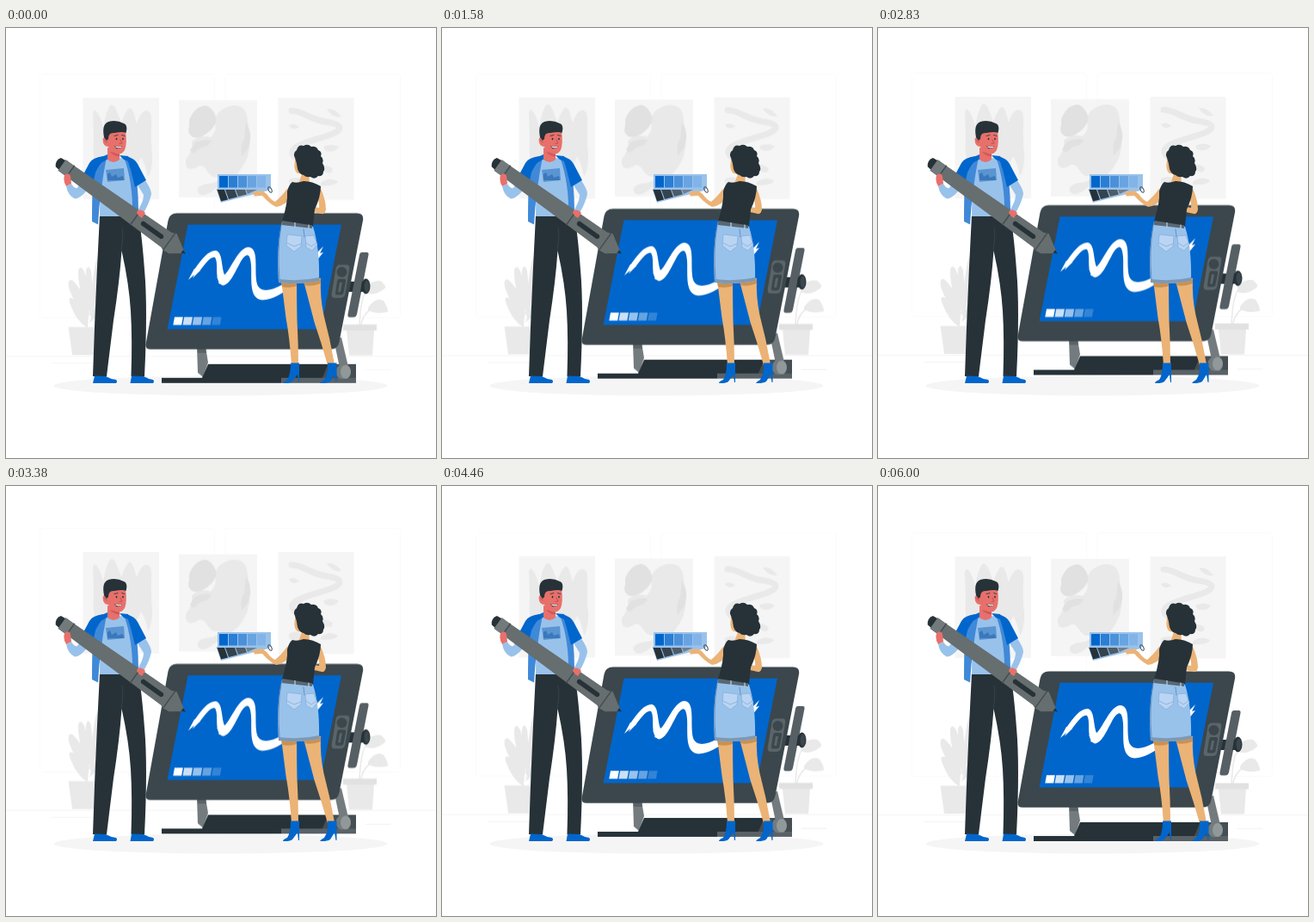
An HTML page that plays this animation: 500x500 px, repeating every 6040 ms.

```html
<!DOCTYPE html>
<html lang="en">
<head>
<meta charset="utf-8">
<title>Drawing tablet</title>
<style>
html, body { margin: 0; width: 100%; height: 100%; overflow: hidden; background: #fff; }
svg { display: block; width: 100vw; height: 100vh; }
.blue { fill: #0066cc; }
.mid { fill: #4089d8; }
.pale { fill: #99c2eb; }
.ink { fill: #263238; }
.body { fill: #3b474c; }
.steel { fill: #737b7e; }
.skin { fill: #e7706b; }
.tan { fill: #ebb376; }
.g1 { fill: #f5f5f5; }
.g2 { fill: #e9e9e9; }
.g3 { fill: #e1e1e1; }
.line { fill: none; stroke-linecap: round; stroke-linejoin: round; }
</style>
</head>
<body>
<svg viewBox="0 0 500 500">
  <g id="room">
    <g class="line" stroke="#fafafa">
      <rect x="39.5" y="54.5" width="203" height="283" rx="3"/>
      <rect x="255" y="54.5" width="203.500" height="283" rx="3"/>
      <path stroke="#f4f4f4" d="M0 382.500H500M53 390.500H108M418 398.500H447"/>
    </g>
    <g class="g1">
      <rect x="89.500" y="82" width="88.500" height="118"/>
      <rect x="201" y="84.700" width="91" height="113"/>
      <rect x="316.500" y="82" width="88" height="118.500"/>
    </g>
    <path class="g2" d="M101 101Q102 93 106 99Q111 107 113 117Q116 98 121 91Q125 88 129 98L134 111Q138 100 142 95Q146 91 149 102L152 112Q156 99 162 97Q169 96 169 108Q168 131 170 150Q170 166 165 174Q162 158 157 151Q149 168 143 183Q130 160 120 172Q112 188 107 174Q100 151 102 130Z"/>
    <path class="g2" d="M247 99Q261 87 274 93Q281 98 281 111Q286 131 281 150Q277 161 268 171L244 187Q230 199 224 193Q219 185 234 182Q247 181 249 174Q239 176 234 167Q228 157 221 163Q208 169 209 154Q218 143 216 133Q224 124 238 128Q247 119 242 108Z"/>
    <path class="g3" d="M213 108Q219 92 232 91Q240 93 244 104Q246 113 235 122Q224 131 216 127Q210 122 213 115ZM279 111Q288 125 281 141L274 150Q272 136 277 130ZM220 134Q232 129 239 132L234 138Q225 139 218 147L214 143Z"/>
    <path class="line" stroke="#e9e9e9" stroke-width="7" d="M332 97C345 97 355 108 372 110C394 113 392 120 374 126C355 132 330 138 333 147C336 156 352 158 376 166"/>
    <path class="g2" d="M373 95Q383 94 390 104Q380 106 373 95ZM329 114Q335 110 341 116Q333 121 329 114ZM369 139Q378 134 387 139Q381 147 371 143ZM366 181Q375 173 386 179Q384 185 366 184ZM329 177Q343 171 350 183Q339 190 329 182Z"/>
    <g class="g2">
      <path d="M72.500 348.500H116L112 381H77Z"/>
      <path d="M94 349Q82 342 75 323Q71 313 77 315Q88 320 95 342ZM94 340Q78 319 73 303Q71 292 77 294Q92 307 97 334ZM94 328Q83 301 84 283Q86 275 91 284Q97 305 97 325ZM95 329Q91 301 93 282Q96 274 99 284Q102 306 98 330ZM97 333Q100 294 104 275Q106 264 110 269Q113 291 99 338ZM97 344Q104 316 116 309Q120 314 113 330Z"/>
      <path d="M396 352H428L426 381.500H399Z"/>
      <path d="M418 302Q427 293 436 295Q442 300 441 303Q430 313 418 309ZM421 326Q430 313 439 318Q444 325 444 331Q430 334 421 329Z"/>
    </g>
    <path class="line" stroke="#e9e9e9" stroke-width="1.500" d="M94 350Q96 330 96 313M411 350Q412 313 420 305M412 350Q414 334 424 328"/>
    <path class="g3" d="M392 345.500H431V352.500H392Z"/>
  </g>

  <ellipse class="g1" cx="249.500" cy="416" rx="194" ry="11.500"/>

  <g id="tablet">
    <path class="steel" d="M222 371H232L235 389L229 406L223 401Z"/>
    <path fill="#5a6367" d="M222 371H232L233 378H223Z"/>
    <path class="ink" d="M235 391H407V413H181V407H228Z"/>
    <path fill="#596266" d="M375 391H407V413H320V407H368Z"/>
    <path fill="#444e53" d="M375 391H407V407H368Z"/>
    <path class="steel" d="M381 362L390 360L398 394L389 400Z"/>
    <ellipse class="steel" cx="391" cy="400" rx="7.500" ry="8.500"/>
    <ellipse cx="395" cy="400" rx="6" ry="8" fill="#91989a"/>
    <path class="ink" d="M397 295H418V307H397Z"/>
    <path fill="#566064" d="M414 261H419.500Q422 261 421.500 264L408 333Q407 336.500 404 336.500H399.500Q397 336.500 397.500 333L411 264Q411.500 261 414 261Z"/>
    <path class="ink" d="M414 295H419V307H412Z"/>
    <ellipse class="ink" cx="418.500" cy="300.500" rx="5" ry="9"/>
    <ellipse cx="419.500" cy="300.500" rx="3" ry="7" fill="#3b474c"/>
    <path class="body" d="M199 215.500H408Q416.500 215.500 415 224L387.500 365Q386 373.800 377 373.800H168Q161.500 373.800 162.700 367L188.500 224Q190 215.500 199 215.500Z"/>
    <path class="blue" d="M211.500 228.800H390L366 350.600H187.500Z"/>
    <path fill="#5a656a" d="M388 275.500H396Q400 275.500 399.300 280L394.500 309Q393.700 314 389 314H382Q378 314 378.700 309L383.500 280Q384.300 275.500 388 275.500Z"/>
    <circle class="body" cx="390.500" cy="284" r="6"/>
    <path class="body" d="M387 292H393Q395.500 292 395 295L392.500 308Q392 310.500 389.500 310.500H385Q382.500 310.500 383 308L385 295Q385.400 292 387 292Z"/>
    <path d="M388 296H391L389 307H386Z" fill="#5a656a"/>
    <g id="chips" fill="#fff"></g>
    <g fill="#fff">
      <path d="M219 281C228 268 236 258.500 244 259C252 261 250 276 254 287C260 284 270 255 282 255C295 256 288 282 292 298C297 312 318 304 345 282L348 288C330 303 314 316 298 316.500C282 315 286 292 285 276C284 262 280 261 274 270C267 282 261 299 252 299.500C241 295 248 274 243 267C238 265 231 275 225 283Z"/>
      <path d="M219 280L212 293L219 287L217 291L226 282ZM252 287L245 290L249 293L247 297Q254 301 260 294ZM357 266L369 254L365 262L369 261L361 271Z"/>
    </g>
  </g>

  <g id="man">
    <path class="ink" d="M109 218H154Q158 241 161 281Q165 325 161 405H145.500Q147 362 145 329Q143 297 134.500 259Q132 295 125 340L117 405H101Q103 340 106 278Z"/>
    <path class="line" stroke="#3b474c" stroke-width=".8" d="M134 258Q137 243 135 232"/>
    <path class="blue" d="M103 404.500L116 405Q121 408 128 409Q130 411 128 413H101ZM146 404.500L160 405Q165 408 171 409Q173 411 171 413H144.500Z"/>
    <path class="pale" d="M90 173L101 181L93 190Q85 199 80 198.500Q72 195 70 184L76 181Q79 187 83 186Z"/>
    <path class="pale" d="M152 181L161 176Q169 187 169 193Q167 203 160 215L154 211Q160 201 160 194Z"/>
    <path class="pale" d="M113 152L142 151Q147 178 148 219H109Q109 185 113 152Z"/>
    <path class="mid" d="M107 152L117 150Q109 190 107 228.500L100 225Q100 185 102 160ZM137 150L148 153Q154 180 154 213L147 219Q148 180 137 150Z"/>
    <path class="blue" d="M113 149Q100 151 97 157L89 172L101 182L104 168Q109 157 116 152ZM140 149Q150 152 153 158L163 177L150 185L145 165Z"/>
    <path class="blue" d="M109 151L118 147L119 152L112 156ZM132 148L142 149L145 156L137 153Z"/>
    <path fill="#5a95d2" d="M116 165L137 163L138 177L118 179Z"/>
    <path fill="#3a78bb" d="M118 177L118 170L121 168L123 173L128 170L130 174L136 172L137 177Z"/>
    <path class="skin" d="M118 139L132 141V153Q125 159 118 153Z"/>
    <path fill="#d0575a" d="M121 144L132 146V149Q126 150 121 144Z"/>
    <path class="skin" d="M118 119Q131 114 139 120Q141 135 138 142Q134 148 128 146Q122 144 119 138Q113 138 112.500 130Q113 125 118 128Z"/>
    <path class="ink" d="M114 127Q111 112 119 109Q128 106 137 111Q142 113 139.500 122Q136 120 126 122Q119 121 119 129L117 131Z"/>
    <ellipse class="ink" cx="128.500" cy="129" rx=".8" ry="1.300"/>
    <ellipse class="ink" cx="136" cy="129" rx=".8" ry="1.300"/>
    <path class="line" stroke="#263238" stroke-width=".8" d="M126 125.500L130 124.500M134.500 124.500L138 125.500"/>
    <path class="line" stroke="#bd424c" stroke-width=".8" d="M133 130L135 134L132 134.500M114.500 130L117 133"/>
    <path class="ink" d="M126 137Q131 139 135 137Q133 141 128 140Z"/>
    <path fill="#fff" d="M127 137.500Q131 139 134.500 137.500L133.500 139Q130 140 127.500 138.500Z"/>
    <g transform="translate(62 157) rotate(35.700)">
      <path class="ink" d="M-2-6Q-6 0-1 6L7 7V-7Z"/>
      <path fill="#666e6f" d="M4-7.500H12L153-10.500L159-13L180 0L165 11L157 12L153 10.500L12 8H4Z"/>
      <path fill="#727a7b" d="M4-7.500H16V8H4Z"/>
      <path class="line" stroke="#434d50" stroke-width="1.400" d="M16-7.500V8M109-9.500V10M157-12V11"/>
      <path class="ink" d="M119-2.500H147Q151 0 147 3H119Q116 0 119-2.500ZM176-2L181 0L176 2.500Z"/>
    </g>
    <path class="skin" d="M68 171Q73 167 75 172L76 181L70 184Q66 178 68 171ZM153 212Q158 210 162 215L158 221Q154 219 152 215Z"/>
  </g>

  <g id="woman">
    <path class="pale" d="M246 170H308V187H246Z"/>
    <g id="cells"></g>
    <path class="pale" d="M244.500 187H307L305 189L250 203Z"/>
    <path class="ink" d="M245.500 188H254L258 199.500L250 201.500Z"/>
    <path fill="#34434e" d="M255 188H266L269 196.500L259 199Z"/>
    <path fill="#4e5c66" d="M267 188H278L280 193.500L270 196Z"/>
    <path fill="#71808c" d="M279 188H292L281 193Z"/>
    <ellipse class="line" stroke="#47515b" cx="307" cy="188" rx="1.800" ry="3.500" transform="rotate(-25 307 188)"/>
    <path class="tan" d="M331 184L336 192Q325 207 314 208Q307 205 298 195L289 195.500L287 191L298 189L303 193Q309 201 313 202Q322 194 326 188Z"/>
    <path class="tan" d="M361 188L366 187Q372 200 372 211Q371 217 367 216L358 214L359 208L364 209Q365 204 361 195Z"/>
    <path class="tan" d="M345 167L352 169L353 181H340ZM337 150Q333 165 339 169L346 170V151Z"/>
    <path class="ink" d="M333 179Q338 181 346 178Q356 178 366 184Q366 196 359 211L357 230L321 225Q328 202 327 190Q329 182 333 179Z"/>
    <path class="ink" d="M336 151Q333 145 338 142Q340 135 346 137Q351 134 355 138Q361 137 363 142Q368 144 366 149Q370 152 368 157Q372 164 369 167Q369 173 363 172Q359 177 354 173Q349 174 346 171Q341 170 339 164Q338 156 336 151Z"/>
    <path class="tan" d="M320 293H338Q338 315 338.500 340Q340 367 340 392H332Q330 362 325.500 337ZM346 294L366 291Q365 313 369.500 334Q377 362 382 391L374 392Q367 367 358.500 342Z"/>
    <path fill="#c99152" d="M320 295H338V300Q330 303 321 301ZM346 295L366 292V297Q356 301 347 299Z"/>
    <path class="pale" d="M321 225L357 231Q365 256 364 294Q342 299 317 296Q314 253 321 225Z"/>
    <path fill="#596873" d="M321.500 224L356 229.500V233L320.500 229Z"/>
    <path fill="#7f99b3" d="M317 292Q342 295 364.500 290V294Q341 299 317 296Z"/>
    <path class="line" stroke="#5e82ab" stroke-width=".8" d="M320 230Q315 260 318 292M346 234L347 243"/>
    <path class="line" stroke="#d5e4f5" d="M336 226.500V231M352 229V233"/>
    <path fill="#b9d5f3" stroke="#7ea5d4" stroke-width=".6" d="M327 240L344 242L343 254L335 260L326 253ZM348 242L358 241L362 252L356 259L349 255Z"/>
    <path class="line" stroke="#7ea5d4" stroke-width=".7" d="M327 250L335 254L343 251M349 250L355 254L361 250"/>
    <path class="blue" d="M331 389.500H341V412H340L339 403L333 411Q330 413.500 322 413Q322 411 327 409Q331 403 331 389.500ZM374 389.500H384.500V412H383.500L382 403L377 411Q373 413.500 365 413Q366 411 370 409Q375 402 374 389.500Z"/>
  </g>
</svg>
<script>
const byId = id => document.getElementById(id);

function addPath(parent, d, attrs) {
  const el = document.createElementNS(parent.namespaceURI, 'path');
  el.setAttribute('d', d);
  for (const key in attrs) el.setAttribute(key, attrs[key]);
  parent.append(el);
}

[1, .8, .6, .4, .2].forEach((opacity, i) =>
  addPath(byId('chips'), `M${196 + i * 11.2} 336.300h9.800l-1.700 9.200h-9.800z`, { opacity }));

['#0066cc', '#2b7ed4', '#4a91da', '#68a4e1', '#82b4e7'].forEach((fill, i) =>
  addPath(byId('cells'), `M${248 + i * 11} 172h10v13.500h-10z`, { fill }));

// Linear bobbing, 10 units up and back; the loop begins slightly into the first rise.
const LEAD = 40, SPAN = 6000, LOOP = 6040;

function bob(id, period) {
  const half = period / 2;
  const phases = [LEAD];
  for (let p = half; p <= SPAN; p += half) phases.push(p);
  phases.push(LEAD + SPAN);
  const frames = phases.map(p => {
    const lift = 10 * (1 - Math.abs((p % period) / half - 1));
    return { offset: (p - LEAD) / SPAN, transform: `translateY(${-lift}px)` };
  });
  byId(id).animate(frames, { duration: LOOP, iterations: Infinity });
}

bob('room', 1500);
bob('tablet', 6000);
</script>
</body>
</html>
```
